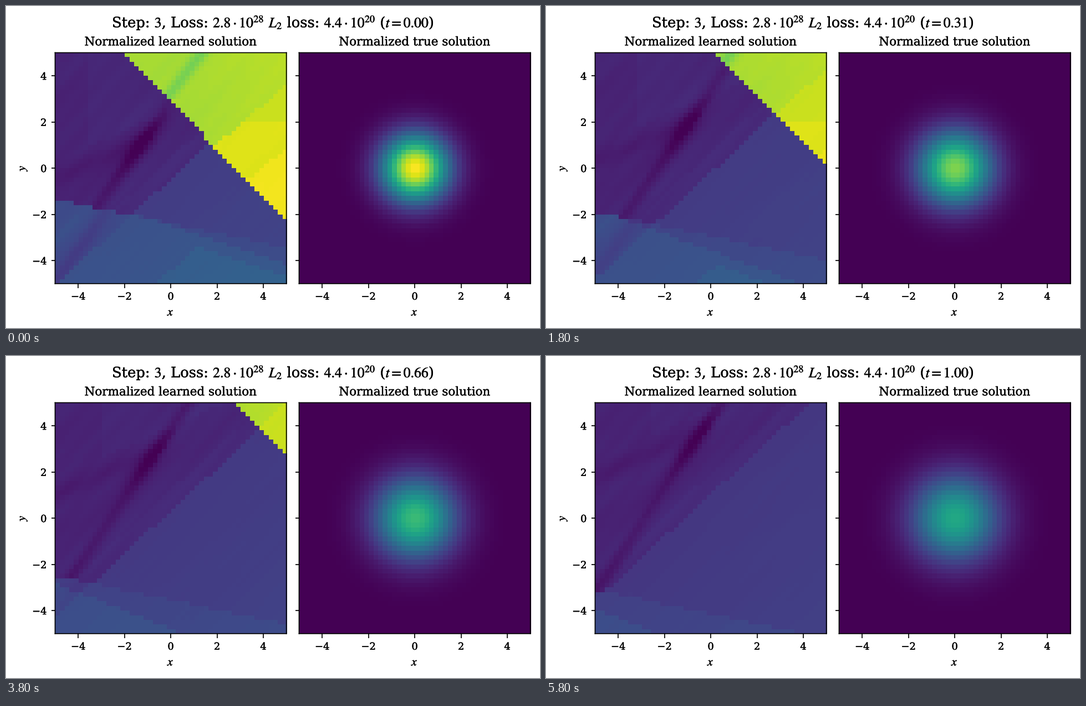
Animation, 963 px wide and 582 px high, one loop 6000 ms. Source, as a matplotlib script:

```python
import numpy as np
import matplotlib.pyplot as plt
from matplotlib.animation import FuncAnimation
from matplotlib.patheffects import withStroke
from matplotlib.text import Text

W, H, DPI = 963, 582, 150
FRAMES, INTERVAL = 30, 200
PT = 72 / DPI       # points per pixel
BASE = 21.5 * PT    # body font size
TOP, BOTTOM, SIDE = 84.4, 501.8, 417.2

plt.rcParams.update({
    "font.family": "DejaVu Serif",
    "mathtext.fontset": "stix",
    "font.size": BASE,
    "axes.linewidth": 1.72 * PT,
    "path.snap": False,
})

fig = plt.figure(figsize=(W / DPI, H / DPI), dpi=DPI, facecolor="white")

centers = np.linspace(-4.9, 4.9, 50)
x, y = np.meshgrid(centers, centers)


def band(d, width):
    return np.exp(-(d / width) ** 2)


def steps(v, n=3):
    return np.round(v * n) / n


def streaks(t):
    """Faint diagonal facets, roughly in [-1, 1]."""
    a = np.sin(2.6 * (y - 0.75 * x) - 3.0 * t)
    b = np.sin(4.7 * (y - 1.2 * x) + 1.0 - 4.0 * t)
    c = np.sin(1.9 * (y - 0.5 * x) + 2.0 - 2.0 * t)
    return steps((a + b + c) / 3)


def learned(t):
    cliff = y - 4.9 + 1.03 * (x + 2 - 7.4 * t)
    crease = (y - (1.42 + 0.1 * t) * x - 2.85 - 1.5 * t) / 1.77
    fold = y - 0.92 * x + 0.45 - 0.6 * t - 0.9 * t ** 2
    shelf = y + 0.21 * x + 2.4 + 1.75 * t
    floor = y + (0.34 + 0.08 * t) * x + 2.5 + 3.5 * t
    facets = streaks(t)

    # blue side, below the fold
    low = 0.19 - 0.015 * t + 0.003 * (x - y - 4) + 0.003 * facets
    low += 0.03 * (shelf < 0) + 0.04 * (floor < 0)
    low += 0.035 * ((floor < -0.5) & (y < 0.95 * x - 4.4))

    # bottom left corner
    corner = 0.183 + 0.015 * facets + 0.045 * (floor < 0)
    corner -= 0.05 * (1 - t) * band(y - 1.4 * x - 2.1 - t, 0.5)

    # purple side with its dark crease
    wedge = y - 0.45 * x - 1.8 - 2.2 * t
    core = band(y - 0.9 - 2.3 * t, 1.1)
    high = np.where(crease < 0, 0.108, 0.1) + 0.012 * facets
    high += 0.012 * ((fold < 0.9) & (crease < -0.3))
    high += 0.01 * ((wedge > 0.7) & (x > -3.6 + t))
    high -= 0.028 * band(wedge, 0.45) * (crease > -0.2)
    high -= (0.042 + 0.06 * core) * band(crease, 0.27 + 0.08 * core)

    # bright side, above the cliff
    ridge = y - 0.87 * x + 0.7 - 2.1 * t
    top = 0.868 + 0.007 * np.clip(x - 1, 0, 4) + 0.008 * facets
    patch = band(y - 1.3 * x - 3.25 - 2 * t, 0.45) * (y > 3 + 4 * t)
    top -= 0.075 * patch
    top = np.where(ridge < 0, 0.92 + 0.004 * facets, top)
    top += 0.03 * ((ridge < 0) & (y < 2))
    top += 0.03 * (1 - t) * (y < 0.8 * x - 3.1)

    v = np.where(fold < 0, low, np.where(shelf < 0, corner, high))
    return np.clip(np.where(cliff > 0, top, v), 0, 1)


def true(t):
    s = 1 + 0.8 * t - 0.14 * t ** 2
    return np.exp(-(x ** 2 + y ** 2) / (2 * s)) / s


def panel(left, title, data, labels):
    ax = fig.add_axes([left / W, 1 - BOTTOM / H, SIDE / W, (BOTTOM - TOP) / H])
    im = ax.imshow(data, origin="lower", extent=(-5, 5, -5, 5), cmap="viridis",
                   vmin=0, vmax=1, interpolation="nearest", aspect="auto")
    ax.set_title(title, fontsize=BASE, pad=13.2 * PT)
    ticks = range(-4, 5, 2)
    ax.set_xticks(ticks)
    ax.set_yticks(ticks)
    ax.tick_params(labelsize=BASE / 1.2, length=7.5 * PT, width=1.72 * PT,
                   pad=7.5 * PT, labelleft=labels)
    fig.text((left + SIDE / 2) / W, 1 - 559.5 / H, "$x$", ha="center",
             va="baseline")
    return im


def heading(t):
    return (r"Step: $3$, Loss: $2.8 \cdot 10^{28}$ $L_2$ loss: "
            rf"$4.4 \cdot 10^{{20}}$ ($t={t:.2f}$)")


left_im = panel(88.5, "Normalized learned solution", learned(0), True)
right_im = panel(528.5, "Normalized true solution", true(0), False)
fig.text(31 / W, 1 - 293 / H, "$y$", rotation=90, ha="center", va="center")
head = fig.text(481 / W, 1 - 38.5 / H, heading(0), fontsize=1.2 * BASE,
                ha="center", va="baseline")

# slightly heavier, unhinted lettering
for label in fig.findobj(Text):
    label.set_path_effects([withStroke(linewidth=0.4 * PT, foreground="black")])


def update(i):
    t = i / (FRAMES - 1)
    left_im.set_data(learned(t))
    right_im.set_data(true(t))
    head.set_text(heading(t))
    return left_im, right_im, head


anim = FuncAnimation(fig, update, frames=FRAMES, interval=INTERVAL,
                     init_func=lambda: update(0), repeat=True, repeat_delay=0)
plt.show()
```
